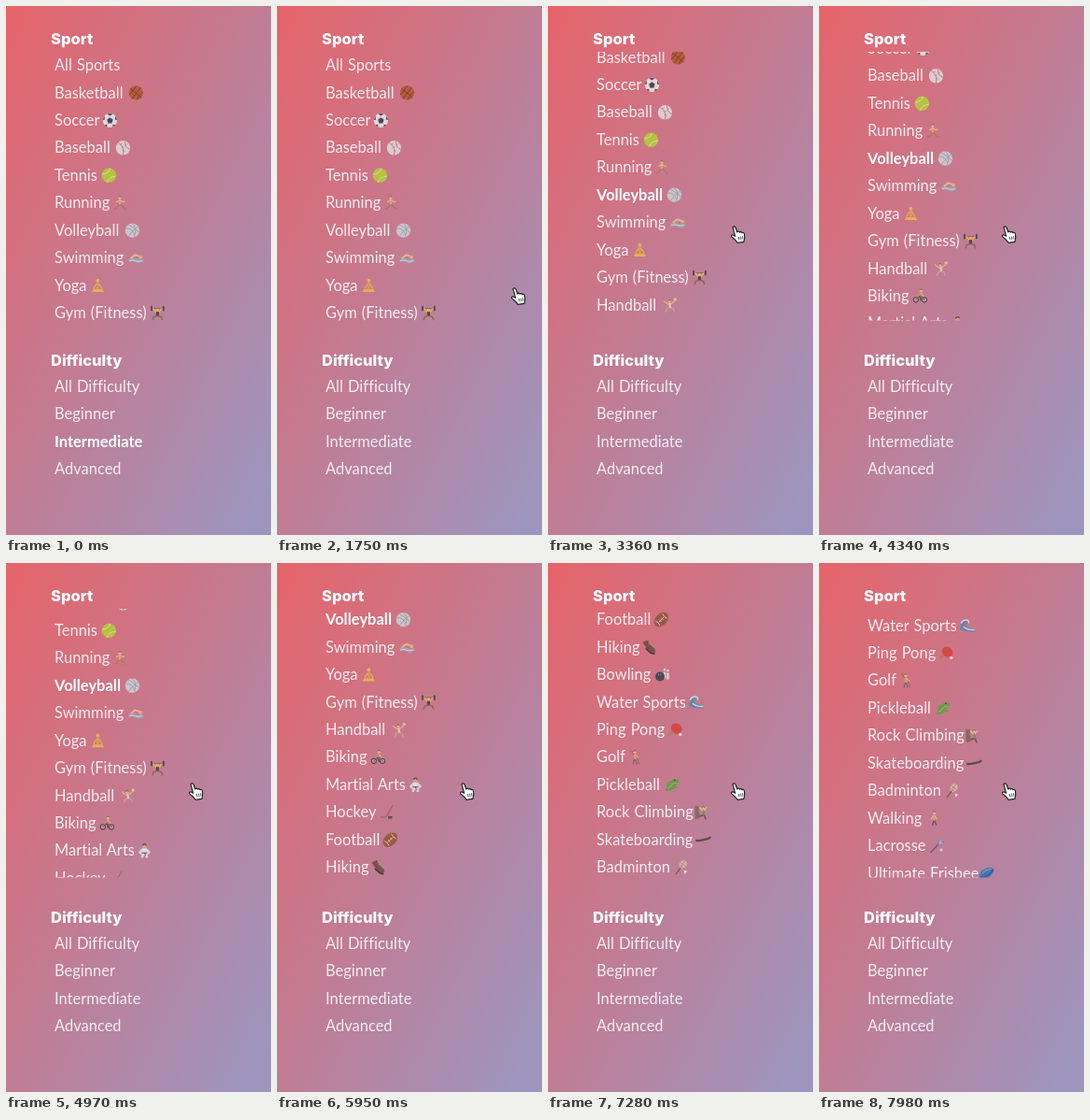
Recreate the animation shown at these times as an HTML page. Size 284 by 566 pixels, loop 8000 ms.

```html
<!DOCTYPE html>
<html lang="en">
<head>
<meta charset="utf-8">
<title>Sport filter</title>
<style>
  html, body { margin: 0; width: 100%; height: 100%; overflow: hidden; }
  body { background: linear-gradient(to bottom right, #e66469, #c07d95 50%, #9e95be 95%); }
  svg { display: block; }
  text { font: 400 16.4px Lato, "Open Sans", sans-serif; letter-spacing: .05px; word-spacing: .8px; fill: #fff; fill-opacity: .86; }
  text.on { font-weight: 700; fill-opacity: 1; }
  text.head { font: 800 16.5px Inter, "Open Sans", sans-serif; letter-spacing: 0; fill-opacity: 1; }
</style>
</head>
<body>
<svg width="284" height="566" viewBox="0 0 284 566">
  <clipPath id="window"><rect y="49" width="284" height="287.5"/></clipPath>
  <text class="head" x="48" y="41.3">Sport</text>
  <g clip-path="url(#window)"><g id="sports"></g></g>
  <text class="head" x="48" y="384.8">Difficulty</text>
  <g id="levels"></g>
  <g id="cursor" fill="#fff" stroke="#222" stroke-width="1.2" stroke-linejoin="round">
    <path d="M-5.6-7.7C-4.7-9-2.9-8.4-2.5-7L-.9-2.3C-.2-3.6 1.4-3.3 1.8-2.2C2.6-3.2 4-2.7 4.4-1.6C5.4-2.3 6.6-1.7 6.8-.4C7.4 2.5 7.4 4.4 6.3 8L-.6 9C-1.8 6.7-3.7 5.2-6.2 3.3C-8.2 1.7-6.4-.2-4.6 1L-3 2Z"/>
    <path d="M.6 2.7L1.4 6M2.8 2.3L3.4 5.6M4.9 2L5.3 5" fill="none" stroke-width=".8"/>
  </g>
</svg>
<script>
const LOOP = 8000, STEP = 70, PITCH = 29.44;
const $ = id => document.getElementById(id);

// Icon pieces, drawn around (0,0) in a box of about 16 px
const dot = (x, y, r, fill) => `<circle cx="${x}" cy="${y}" r="${r}" fill="${fill}"/>`;
const oval = (rx, ry, turn, fill) => `<ellipse rx="${rx}" ry="${ry}" transform="rotate(${turn})" fill="${fill}"/>`;
const shape = (d, fill) => `<path d="${d}" fill="${fill}"/>`;
const line = (d, color, width = 1) =>
  `<path d="${d}" fill="none" stroke="${color}" stroke-width="${width}" stroke-linecap="round" stroke-linejoin="round"/>`;
const SKIN = "#e6b892", GOLD = "#e9b550", DARK = "#4d424b";
const figure = (x, y, arms, torso, legs, shirt, trousers) =>
  line(legs, trousers, 1.5) + line(torso, shirt, 2.4) + line(arms, SKIN, 1.2) +
  dot(x, y, 1.8, SKIN) + line(`M${x - 1.3} ${y - 1}q1.4-1.5 2.6 0`, "#76503e", 1);
const wheels = [-4.6, 4.6].map(x => dot(x, 4, 3.1, DARK) + dot(x, 4, 2.1, "#b69ca6")).join("");

const sports = [
  ["All Sports", 0, ""],
  ["Basketball", 139, dot(0, 0, 7.6, "#b65a37") +
    line("M-6-4.5Q0 0 5.5 5M-4 6Q0 0 5-5.5M-7 2Q-2-3 0-7M1 7Q3 2 7-1", "#5f332a", .8)],
  ["Soccer", 111, dot(0, 0, 7.7, "#e4dfe3") +
    shape("M0-3.2L3.2-.8L2 3H-2L-3.2-.8ZM-3-7Q0-8 3-7L0-5ZM6-4.8L7.6-.5L5.4-1ZM-6-4.8L-7.6-.5L-5.4-1ZM3.2 4.4L6 4.8L3 7ZM-3.2 4.4L-6 4.8L-3 7Z", "#47434b")],
  ["Baseball", 125, dot(0, 0, 7.7, "#ddd4d7") + line("M-4.8-5.6Q2-1 .2 7.2M2-7Q2 0 7.2 1.6", "#b8696d", .8) +
    line("M-2.8-3.7l1.5-1M-.7-.6l1.7-.5M0 3l1.8.2M2.6-3l1.3-1", "#b8696d", .7)],
  ["Tennis", 110, dot(0, 0, 7.7, "#b4c93c") + line("M-7-1.5Q-1-1 1-7M-2 7Q0 1 7 1", "#dfe7a6", .9)],
  ["Running", 122, figure(-.5, -5.6, "M.6-3l2.2 2 1.6-.8M-1.2-2.8l-2.6 1.6", "M-.4-2.8L-.6.6", "M-.3 1.4l2.4 2 3.4 3M-.8 1.4l-2 3-3 2", "#e2a95e", "#a8796d")],
  ["Volleyball", 135, dot(0, 0, 7.7, "#cbcbd1") +
    line("M-7-2Q0-4 3 7M-4-6Q2-3 7 2M6-4Q0 0-4 6M0-7.5Q5-4 3 4", "#9698a3", .8)],
  ["Swimming", 139, shape("M-8 1Q-4-1 0 1T8 1V4Q4 7 0 5T-8 4Z", "#97a9b6") + line("M-5 0L-1-3.4 4-1.5", SKIN, 1.9) +
    dot(4.7, -.8, 2, "#dfb280") + line("M-7 3q3-1.5 6 0t7 0", "#dad7dd", 1)],
  ["Yoga", 98, line("M-5.5 6.2Q-2 3.6 0 5.4Q2 3.6 5.5 6.2Z", GOLD, 1.7) + line("M0-1.6V3.4", "#d99c55", 2.8) +
    line("M-1.2-1.6L-3.6 1.6-4.6 4.8M1.2-1.6L3.6 1.6 4.6 4.8", GOLD, 1.2) + dot(0, -5.3, 2, GOLD)],
  ["Gym (Fitness)", 162, line("M-7-5H7", "#65606a", .8) + line("M-6.4-6.8v3.8M6.4-6.8v3.8", "#45434c", 1.8) +
    line("M-1.5-.8L-4.4-4.6M1.5-.8L4.4-4.6", GOLD, 1.4) + line("M0-.5V2", DARK, 3.2) + line("M-1 3l-3.2 1.2-1 3M1 3l3.2 1.2 1 3", "#8d6751", 1.6) + dot(0, -3, 1.8, GOLD)],
  ["Handball", 130, figure(-.5, -3.8, "M1-1l4-3M-2-1l-4-3", "M0-1L.5 2", "M0 3l-3 1.2-1 3M1 3l3 1 .6 3", "#dfd1bf", "#c8a091") + dot(5.8, -6, 1.7, "#e6c785")],
  ["Biking", 108, wheels + line("M-4.6 4L-1 .5 2.8.8 4.6 4M-1 .5L1 4.5", "#8f5450", 1) +
    figure(1, -5.8, "M.8-3l2.8 3", "M.2-3L-2.6-.2", "M-2.6 0l3 1.4.4 3", "#b8974f", "#5b4f5a")],
  ["Martial Arts", 148, line("M-1.6 3L-2.4 6.5M1.6 3L2.4 6.5", "#ddd7dc", 2.8) + line("M-2-1.4l-3 3 2 1.6M2-1.4l3 3-2 1.6", "#ddd7dc", 2.6) +
    line("M0-1V3", "#e6e1e4", 4.4) + line("M-2.5 2.4H2.5M0 2.4l1 2.6", "#514a55", 1) + dot(0, -4.8, 2.5, "#d1a584") + line("M-1.8-6Q0-8.2 1.8-6", "#5d4a4f", 1.4)],
  ["Hockey", 117, line("M6.5-7L-.2 4.2Q-1.6 6-6 4.8", "#a2665a", 1.3) + shape("M1.6 4.2h4.6v2.6H1.6Z", "#5d4c53")],
  ["Football", 121, oval(9, 6.3, -45, "#955840") + line("M-2.4 2.4L2.4-2.4M-1.8.4l1.5 1.5M.3-1.7l1.5 1.5", "#e4d2cb", .9) +
    line("M-6 1.4Q-2.8 2.8-1.4 6M1.4-6Q2.8-2.8 6-1.4", "#dcc8c1", 1)],
  ["Hiking", 108, shape("M-7-5.4L-1.4-7.6L1.6-2.4L6.4 2.4Q7.4 4.6 5.6 6L2 5.4L-2.4 2Z", "#705044") +
    line("M-3 1.8L1.6 6 5.4 7", "#41383b", 1.8) + line("M-.8-4.6l1.8-.9M.3-2.8l1.8-.8", "#c79f74", .8)],
  ["Bowling", 122, line("M2.6-5.6V3M6-4.5V4", "#ddd3d6", 2.6) + line("M1.5-3.5h2.2M5-2.6h2", "#c05e64", 1) +
    dot(-2.4, 2, 5, "#45444f") + dot(-3.8, -.2, .8, "#8d91a1") + dot(-1.7, -.5, .7, "#8d91a1")],
  ["Water Sports", 158, shape("M-7.5 4Q-6.5-1-5.5-3.5Q-3.6-7-.4-6.4Q2.8-6 2-3Q0-4.6-1.4-2.5Q-1.4 1 3 2.5L8 3V6.5Q0 7.6-7.5 4Z", "#5c89ae") +
    line("M-6-3Q-3.5-6.6-.4-6Q2.6-5.4 2-3M-3 1.5q4 3.2 10.5 3", "#d2dbe5", 1.5)],
  ["Ping Pong", 136, `<g transform="translate(1.2 -1.2)">${oval(6.2, 5.4, 30, "#d4473f")}</g>` +
    line("M-3.4 2.6L-6.6 5.6", "#b27d5a", 2.2) + dot(5.4, 5, 1.7, "#e9dbd6")],
  ["Golf", 93, figure(-.5, -5.6, "M0-2.5l3 2.6-2 1", "M-.6-2.5V1", "M-1 2l-1 5M0 2l1.6 5", "#c9a05c", "#7d6674") + line("M2 .5L4 7M-2-3L-4-7", "#6d5d66", .8)],
  ["Pickleball", 132, shape("M-7.5 5.6Q-3.6 4-5.4-.6Q-3.4-4.6.4-4.4Q1.6-7.8 4.4-6L8-5.2Q7.4-1.2 4 0L6.6 3.6Q3 3 1.4 5Q-3 8-7.5 5.6Z", "#6a9a49") +
    line("M-4 4Q-1 3 1-1L5-2", "#a2be68", 1) + dot(3.4, -5, .8, "#31432b")],
  ["Rock Climbing", 164, shape("M-7-7L-2-6L-3-1L-1 4L-3 7H-7Z", "#84695a") +
    figure(2, -4.5, "M1-2l-3-3M3-2l2.5-3", "M2-2L2.5 2", "M2 3l-3 1M3 3l1.5 4", "#7c8d53", "#634e55")],
  ["Skateboarding", 166, dot(-3.4, 2.8, 1.2, "#b59a75") + dot(4, 1, 1.2, "#b59a75") + line("M-7.2.8L-4.4 1 4.8-1 7.2-2.4", "#554a42", 2.3)],
  ["Badminton", 142, `<g transform="translate(2.2 -3) rotate(35)">${oval(3.8, 4.8, 0, "#d9b8a5")}</g>` +
    line("M0-5l5 4M-1-2l4 3M4-7l-4 7", "#a7766b", .7) + line("M-.7 1L-5 7", "#79564e", 1.4) + shape("M3 3.2L7 4L4.2 7.4Z", "#e5dddc")],
  ["Walking", 123, figure(.2, -5.6, "M1-2.4l1.8 3M-1-2.4l-1.8 3.2", "M0-2.4V1.4", "M0 2l-1.6 5M.2 2l2 5", "#dfa650", "#5d566a")],
  ["Lacrosse", 126, line("M-6.7 7L2-2", "#5d566c", 1.3) + shape("M1.5-1Q0-5 3-7Q7-8 7.4-4Q6 0 1.5-1Z", "#857da4") +
    line("M2.4-4l4 2M4-6.5l-1 5M6.5-6l-4 4", "#d4cbdd", .7) + dot(4.6, 4.5, 1.7, "#d5cbd6")],
  ["Ultimate Frisbee", 179, oval(8.6, 5, -32, "#3f78b1") + line("M-6 4.6Q3 3.6 7.2-3.8", "#2d5985", 1.5) + line("M-4.6 0Q-1-4 4.4-4.6", "#78a5ce", 1)],
];

const row = (label, baseline) => `<text x="52" y="${baseline}">${label}</text>`;
$("sports").innerHTML = sports.map(([name, x, icon], i) => {
  const y = 63.5 + i * PITCH;
  return row(name, y + 5.6) + (icon && `<g transform="translate(${x + .4} ${y})" opacity=".92">${icon}</g>`);
}).join("");
$("levels").innerHTML = ["All Difficulty", "Beginner", "Intermediate", "Advanced"]
  .map((name, i) => row(name, 412.7 + i * PITCH)).join("");

const find = name => [...document.querySelectorAll("text")].find(el => el.textContent === name);
const intermediate = find("Intermediate"), volleyball = find("Volleyball");

// Smooth, never overshooting curve through [time, value] points
function track(points) {
  const slopes = points.slice(1).map(([t, v], i) => (v - points[i][1]) / (t - points[i][0]));
  const tangents = points.map((_, i) => {
    const a = slopes[i - 1], b = slopes[i];
    return a * b > 0 ? 2 * a * b / (a + b) : 0;
  });
  tangents[points.length - 1] = slopes[slopes.length - 1] * .6;
  return time => {
    if (time <= points[0][0]) return points[0][1];
    const i = points.findIndex(([t]) => time <= t);
    if (i < 0) return points[points.length - 1][1];
    const [t0, v0] = points[i - 1], [t1, v1] = points[i], d = t1 - t0, u = (time - t0) / d, w = 1 - u;
    return v0 * (1 + 2 * u) * w * w + tangents[i - 1] * d * u * w * w +
      v1 * u * u * (3 - 2 * u) - tangents[i] * d * u * u * w;
  };
}
const scroll = track([[2590, 0], [3360, 38], [4340, 77], [5950, 179.5], [6790, 340], [7980, 497]]);
const cursorX = track([[1330, 300], [1750, 258.6], [2310, 203.6], [2380, 203.6]]);
const cursorY = track([[1330, 337], [1750, 310.3], [2310, 244.3], [2380, 244.3]]);

function draw(now) {
  const time = Math.floor(now % LOOP / STEP) * STEP;
  $("sports").setAttribute("transform", `translate(0 ${-scroll(time)})`);
  $("cursor").setAttribute("transform", `translate(${cursorX(time)} ${cursorY(time)})`);
  intermediate.classList.toggle("on", time < 280);
  volleyball.classList.toggle("on", time >= 2310);
}
let start;
function tick(now) {
  start ??= now;
  draw(now - start);
  requestAnimationFrame(tick);
}
draw(0);
requestAnimationFrame(tick);
</script>
</body>
</html>
```
